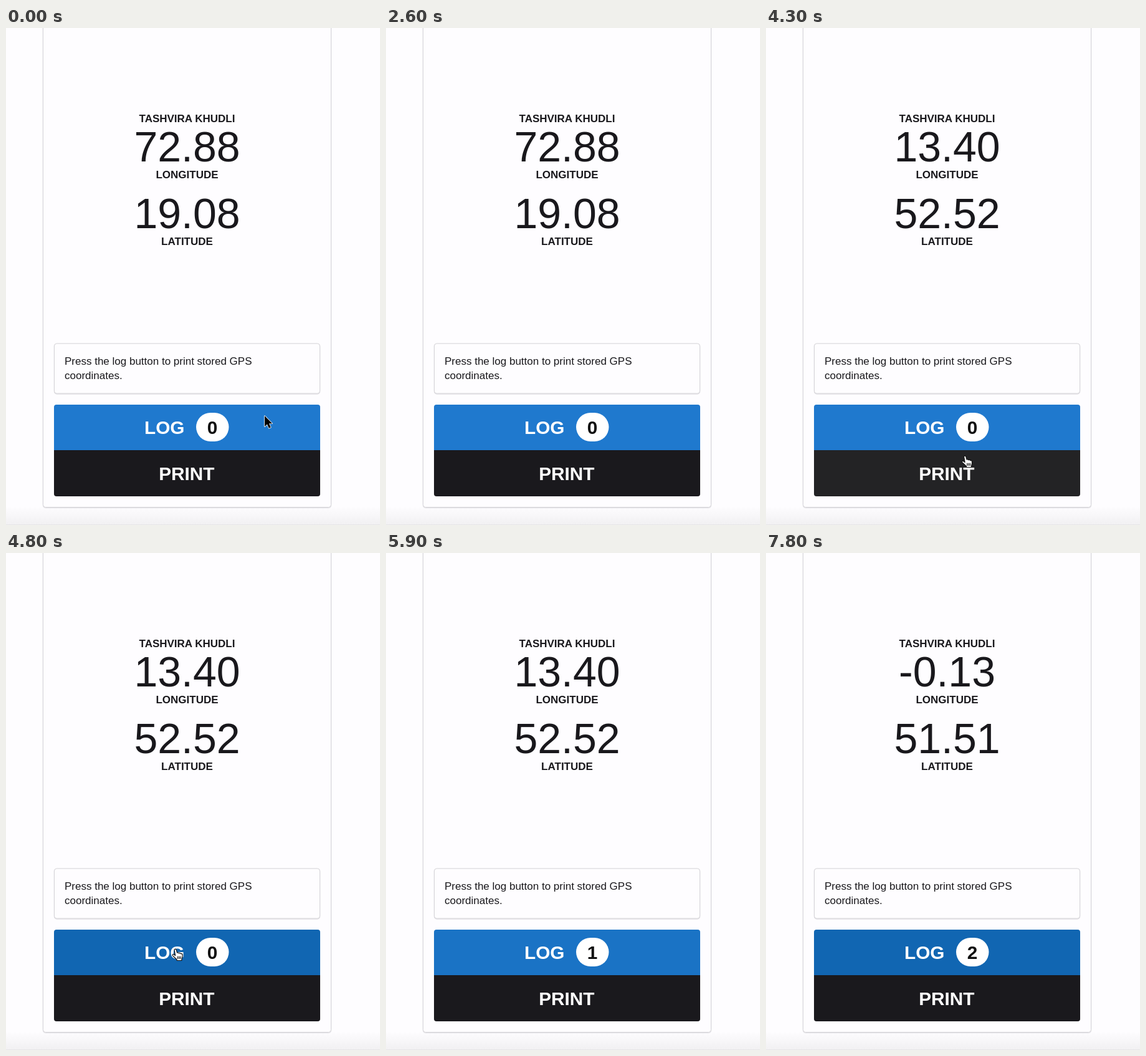
Write an HTML page that moves like this. It is 600 px wide and 797 px high and loops after 8000 ms.

```html
<!DOCTYPE html>
<html lang="en">
<head>
<meta charset="utf-8">
<title>GPS logger</title>
<style>
  html, body { margin: 0; width: 100%; height: 100%; overflow: hidden; background: #fefdff; }
  svg { display: block; width: 100vw; height: 100vh; }
  text { font-family: "Liberation Sans", Arial, sans-serif; font-size: 17px; fill: #19181c; }
  .mid { text-anchor: middle; }
  .bold { font-weight: 700; }
  .value { font-size: 68px; }
  .button { font-size: 29.75px; font-weight: 700; fill: #fff; }
  .card { fill: #fefdff; stroke: #d5d4d8; }
  .shade { fill: none; stroke: #e3e2e6; stroke-width: 1.5; }
</style>
</head>
<body>
<svg viewBox="0 0 600 797">
  <defs>
    <linearGradient id="floor" x2="0" y2="1">
      <stop offset="0" stop-color="#fefdff"/>
      <stop offset="1" stop-color="#f1f0f2"/>
    </linearGradient>
  </defs>
  <rect y="767" width="600" height="30" fill="url(#floor)"/>
  <rect y="796" width="600" height="1" fill="#e6e5e7"/>

  <rect class="shade" x="59.5" y="-20" width="462" height="789.5" rx="4"/>
  <rect class="card" x="59.5" y="-20" width="462" height="788.5" rx="4"/>
  <text class="mid bold" x="290.5" y="151.3">TASHVIRA KHUDLI</text>
  <text class="mid value" id="lon" x="290.5" y="214"></text>
  <text class="mid bold" x="290.5" y="241.3">LONGITUDE</text>
  <text class="mid value" id="lat" x="290.5" y="321"></text>
  <text class="mid bold" x="290.5" y="348">LATITUDE</text>

  <rect class="shade" x="77.5" y="506.5" width="426" height="80.5" rx="4"/>
  <rect class="card" x="77.5" y="506" width="426" height="80" rx="4"/>
  <text x="94" y="540">Press the log button to print stored GPS</text>
  <text x="94" y="563">coordinates.</text>

  <path id="log" d="M77 677V608a4 4 0 0 1 4-4H500a4 4 0 0 1 4 4V677Z"/>
  <path id="print" d="M77 677H504V747a4 4 0 0 1-4 4H81a4 4 0 0 1-4-4Z"/>
  <text class="button" x="222" y="651">LOG</text>
  <rect x="305" y="617" width="52.5" height="46" rx="23" fill="#fff"/>
  <text class="button mid" id="count" x="331" y="651" style="fill:#111"></text>
  <text class="button" x="245.2" y="725">PRINT</text>

  <g id="arrow" stroke-linejoin="round">
    <path d="M.5 .5V17.6L4.5 13.9L7.3 20.3L10.3 19L7.5 12.8H12.6Z"
      fill="#000" stroke="#fff" stroke-width="1.6" paint-order="stroke"/>
  </g>
  <g id="hand" stroke="#111" stroke-width="1.2" stroke-linejoin="round" stroke-linecap="round">
    <path fill="#fff" d="M-1 1.2C-.2-.7 1.9 0 2.3 1.6L3.6 6.2C4.4 5.4 6 5.7 6.3 6.9C7.3 6.1 8.8 6.5 9.1 7.6C10.4 7 11.8 7.7 12 9.2C12.3 11.5 12 13.5 11.1 15.4L10.8 18.5H3.3L2.7 16.6C.6 15-1.8 12.3-3.6 10.6C-4.7 9.3-3.2 7.8-1.7 8.8L.6 10.5Z"/>
    <path d="M4.3 12V15.6M6.6 12V15.6M8.9 12V15.6"/>
  </g>
</svg>
<script>
const LOOP = 8000, STEP = 100;
const $ = id => document.getElementById(id);

// Each run is one appearance of the pointer: [time, x, y]; it hides after the last point.
const runs = [
  [[0, 414.5, 621.5], [300, 418, 624], [800, 402, 629], [1100, 402, 629]],
  [[4200, 326, 686], [4300, 318.5, 686], [4500, 285, 655], [4700, 271, 635],
   [5100, 271, 635], [5400, 430, 610], [5700, 538, 536]],
  [[7000, 432, 557.5], [7200, 350, 622], [7300, 290, 640], [7500, 290, 640],
   [7700, 506, 622], [7800, 506, 622]]
];

const clamp = v => Math.min(1, Math.max(0, v));
const ramp = (t, a, b) => clamp((t - a) / (b - a));
const mix = (a, b, k) => `rgb(${a.map((v, i) => Math.round(v + (b[i] - v) * k))})`;

function pointerAt(t) {
  const run = runs.find(r => t >= r[0][0] && t < r[r.length - 1][0]);
  if (!run) return null;
  const i = run.findIndex(p => p[0] > t);
  const [t0, x0, y0] = run[i - 1], [t1, x1, y1] = run[i];
  const k = ramp(t, t0, t1), e = k * k * (3 - 2 * k);
  return [x0 + (x1 - x0) * e, y0 + (y1 - y0) * e];
}

function place(id, pos, shown) {
  $(id).style.display = shown ? "" : "none";
  if (shown) $(id).setAttribute("transform", `translate(${pos})`);
}

function draw(t) {
  const [lon, lat] = t < 4200 ? ["72.88", "19.08"] : t < 7000 ? ["13.40", "52.52"] : ["-0.13", "51.51"];
  $("lon").textContent = lon;
  $("lat").textContent = lat;
  $("count").textContent = t < 4900 ? 0 : t < 7500 ? 1 : 2;

  const logHover = ramp(t, 4500, 4800) - ramp(t, 5700, 6000) + ramp(t, 7100, 7400);
  const printHover = ramp(t, 4100, 4300) - ramp(t, 4500, 4700);
  $("log").setAttribute("fill", mix([31, 121, 206], [17, 102, 178], logHover));
  $("print").setAttribute("fill", mix([26, 25, 29], [35, 35, 37], printHover));

  const pos = pointerAt(t);
  const over = pos && t > 4000 && pos[0] > 77 && pos[0] < 504 && pos[1] > 604;
  place("hand", pos, over);
  place("arrow", pos, pos && !over);
}

const start = performance.now();
function tick() {
  const t = (performance.now() - start) % LOOP;
  draw(Math.floor(t / STEP) * STEP);
  requestAnimationFrame(tick);
}
tick();
</script>
</body>
</html>
```
